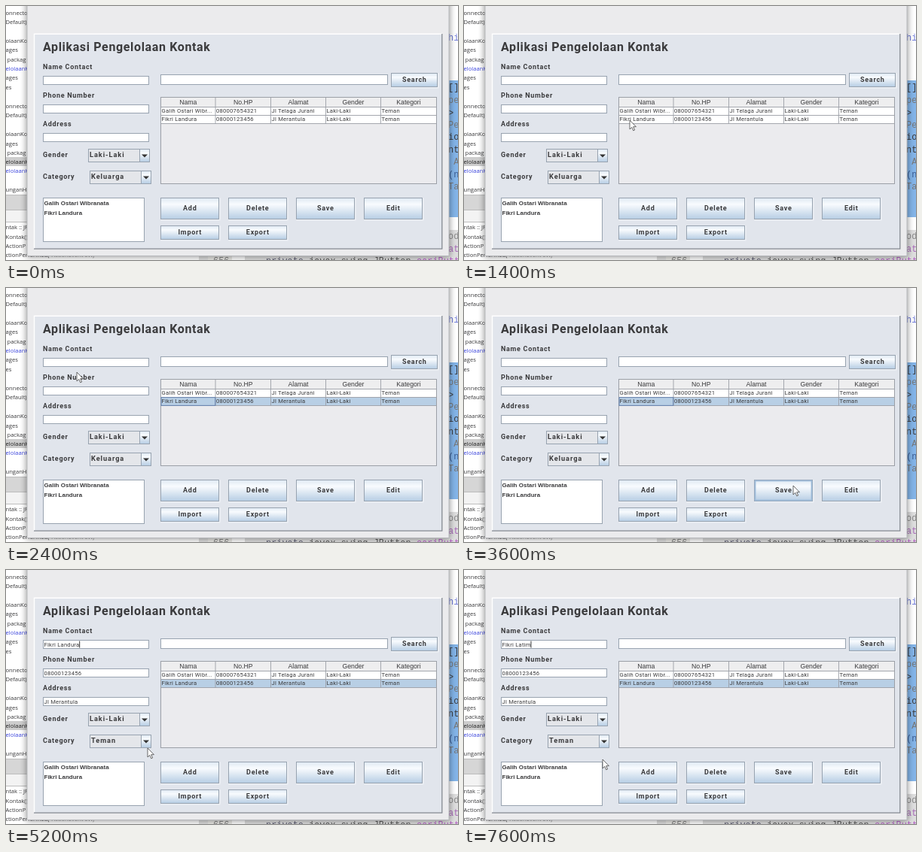
An HTML page that plays this animation: 600 by 338 pixels, repeating every 8000 ms.

```html
<!DOCTYPE html>
<html lang="id">
<head>
<meta charset="utf-8">
<title>Aplikasi Pengelolaan Kontak</title>
<style>
html, body { margin: 0; width: 100%; height: 100%; overflow: hidden; background: #fff; }
svg { display: block; width: 100%; height: 100%; }
text { white-space: pre; fill: #3a3a3c; }
.title { font: 700 16px Roboto, sans-serif; letter-spacing: .64px; }
.label { font: 700 9px Roboto, sans-serif; letter-spacing: .7px; }
.btn { font: 700 9px Roboto, sans-serif; letter-spacing: .75px; }
.combo { font: 700 9.2px Roboto, sans-serif; letter-spacing: .95px; }
.cell { font: 7.6px Roboto, sans-serif; letter-spacing: .25px; }
.head { font: 8.7px "Liberation Sans", Arial, sans-serif; }
.item { font: 700 8px "Liberation Sans", Arial, sans-serif; }
.tree { font: 7.6px "Open Sans", sans-serif; }
.code { font: 11.9px "Liberation Mono", monospace; }
.mid { text-anchor: middle; }
</style>
</head>
<body>
<svg id="stage" viewBox="0 0 600 338" preserveAspectRatio="none">
  <defs>
    <linearGradient id="metal" x2="0" y2="1">
      <stop offset="0" stop-color="#dfe9f3"/>
      <stop offset=".3" stop-color="#f8fbfe"/>
      <stop offset=".5" stop-color="#e6eef6"/>
      <stop offset="1" stop-color="#b6cde4"/>
    </linearGradient>
    <filter id="blur" x="-10%" y="-10%" width="120%" height="120%"><feGaussianBlur stdDeviation="4"/></filter>
  </defs>
</svg>
<script>
const LOOP = 8000, STEP = 200;
const BORDER = '#98a3b0', GRID = '#9b9fa6';
const svg = document.getElementById('stage');

function el(tag, attrs, parent = svg) {
  const node = document.createElementNS('http://www.w3.org/2000/svg', tag);
  for (const k in attrs) node.setAttribute(k, attrs[k]);
  return parent.appendChild(node);
}
function rect(x, y, width, height, fill, stroke = 'none', more = {}) {
  return el('rect', { x, y, width, height, fill, stroke, ...more });
}
function text(x, y, str, cls, fill) {
  const node = el('text', { x, y, class: cls });
  if (fill) node.style.fill = fill;
  node.textContent = str;
  return node;
}
function line(d, stroke, width = 1) {
  return el('path', { d, stroke, fill: 'none', 'stroke-width': width });
}
function show(node, on) {
  node.setAttribute('visibility', on ? 'visible' : 'hidden');
}

const person = {
  full: 'Galih Ostari Wibranata', cut: 'Galih Ostari Wibr...',
  phone: '080007654321', street: 'Jl Telaga Jurani'
};
const second = { name: 'Fikri Landura', phone: '08000123456', street: 'Jl Merantula' };
const stem = 'Fikri La', ending = 'tim';

// Editor behind the window
function drawEditor() {
  rect(0, 0, 600, 338, '#fff');
  rect(0, 201, 40, 12, '#cdcdcd');
  rect(0, 251.5, 40, 19.5, '#d6d6d6');
  rect(0, 271, 40, 16, '#f3f3f3');
  line('M0 251.5H40M0 271.5H40M0 287.5H40', '#bdbdbd');
  const blue = '#3a44dd';
  [[9, 'onnecto'], [21, 'Default)'], [46, 'olaanKon'], [58, 'ages'], [71, ' packag'],
   [83, 'elolaanK', blue], [95, 'ages'], [108, 'es'], [133, 'onnecto'], [145, 'Default)'],
   [170, 'olaanKon'], [183, 'ages'], [195, ' packag'], [207, 'elolaanK', '#222'],
   [219, 'elolaanK', blue], [244, 'unganH'], [294, 'ntak :: JF'], [307, 'Kontak()'],
   [319, 'ActionP'], [331, 'ctionPerformed(']
  ].forEach(([y, s, c]) => text(-.5, y + 2.7, s, 'tree', c));
  text(60.5, 333.7, 'ActionEvent evt)', 'tree', '#888');

  rect(256, 325, 12, 13, '#dcdcdc');
  rect(268, 325, 32, 13, '#e9e8e4');
  rect(300, 325, 300, 13, '#fff');
  rect(317, 298, 283, 40, '#dedede');
  text(275, 343, '656', 'code', '#808080');
  text(345, 343, 'private', 'code', '#5c5c70');
  text(402, 343, 'javax.swing.JButton', 'code', '#555');
  text(545, 343, 'cariButton', 'code', '#b45fc4');

  rect(580, 99, 20, 182, '#83b4e8');
  [[42, 'hi', '#6a76d8'], [108, '[]'], [125, 'pe', '#777'], [142, '>'], [158, 'Pe', '#777'],
   [174, 'io'], [191, 'nt'], [207, ' A', '#777'], [224, '(n', '#3a5a90'], [240, 'Ta', '#777'],
   [306, 'od', '#888'], [323, 'at', '#a868b8']
  ].forEach(([y, s, c]) => text(587, y + 4, s, 'code', c));
}

function drawWindow() {
  rect(27, -20, 562, 354, '#000', 'none', { opacity: .42, filter: 'url(#blur)' });
  rect(28, -2, 560, 334.6, '#ebebed', '#b7b9bc');
  rect(37, 37, 542, 286.5, '#e1e5ec');
  line('M37.5 323V37.3H579', '#fff', 1.4);
  line('M37 323.2H578.8V37', '#858a92', 1.3);
}

function field(x, y, w, h) {
  rect(x + .5, y + .5, w - 1, h - 1, '#fff', BORDER);
}

function button(x, y, w, h, label) {
  rect(x + 1, y + 1, w, h, 'none', '#f1f4f8');
  rect(x + .5, y + .5, w - 1, h - 1, 'url(#metal)', BORDER);
  const hover = rect(x + 1.5, y + 1.5, w - 3, h - 3, 'none', '#9dbbd9', { 'stroke-width': 1.8 });
  text(x + w / 2 + .3, y + h / 2 + 2.3, label, 'btn mid');
  return { hit: (px, py) => px > x && px < x + w && py > y && py < y + h, hover };
}

function combo(x, y, w, h, label) {
  rect(x + .5, y + .5, w - 1, h - 1, '#e4e6ea', BORDER);
  rect(x + w - 13.5, y + .5, 13, h - 1, 'url(#metal)', BORDER);
  const cx = x + w - 7, cy = y + h / 2;
  el('path', { d: `M${cx - 4} ${cy - 1.5}h8l-4 4z`, fill: '#333' });
  return text(x + 2, cy + 2.4, label, 'combo');
}

drawEditor();
drawWindow();
text(49, 59.8, 'Aplikasi Pengelolaan Kontak', 'title');
[[84.3, 'Name Contact'], [122.3, 'Phone Number'], [160.3, 'Address'], [201.3, 'Gender'], [230.3, 'Category']]
  .forEach(([y, s]) => text(49, y, s, 'label'));

const inputs = [93, 131, 169].map(y => {
  field(49, y, 141, 12);
  return text(50.5, y + 8.6, '', 'cell');
});
const caret = line('', '#222', .9);
field(205, 91, 302, 14);
combo(109, 190, 82, 18, 'Laki-Laki');
const category = combo(111, 219, 82, 18, 'Keluarga');

// Contact table
const cols = [205.5, 278, 351.5, 424.5, 497.5, 571.5];
rect(205.5, 121.5, 366, 115, '#ebebee', GRID);
rect(206, 122, 365, 12, '#eeeeef');
rect(206, 134.5, 365, 11, '#fff');
const row = rect(206, 145.5, 365, 11, '#fff');
line('M205.5 134.5H571.5M205.5 145.5H571.5M205.5 156.5H571.5', GRID, .9);
cols.slice(1, 5).forEach(x => line(`M${x} 122V156.5`, GRID, .9));
['Nama', 'No.HP', 'Alamat', 'Gender', 'Kategori']
  .forEach((s, i) => text((cols[i] + cols[i + 1]) / 2, 131.2, s, 'head mid'));
const cells = [
  [person.cut, person.phone, person.street, 'Laki-Laki', 'Teman'],
  [second.name, second.phone, second.street, 'Laki-Laki', 'Teman']
];
cells.forEach((list, r) => list.forEach((s, i) => text(cols[i] + 1, 142 + r * 10.8, s, 'cell')));
const cellFocus = rect(206, 145.7, 71.8, 10.6, 'none', '#5f7fb0', { 'stroke-width': .9 });

field(49, 255, 135, 59);
text(50.5, 264.8, person.full, 'item');
text(50.5, 277.5, second.name, 'item');

const buttons = [
  [511, 89, 62, 19, 'Search'], [205, 255, 78, 29, 'Add'], [295, 255, 78, 29, 'Delete'],
  [385, 255, 78, 29, 'Save'], [475, 255, 78, 29, 'Edit'],
  [205, 292, 78, 19, 'Import'], [295, 292, 78, 19, 'Export']
].map(b => button(...b));
const editFocus = rect(503.5, 262.5, 20, 12, 'none', '#a3b8cc');

const pointer = el('path', {
  d: 'M0 0V12L2.8 9.4L4.7 13.8L6.6 13L4.7 8.7H8.4Z',
  fill: '#fff', stroke: '#444', 'stroke-width': .8, 'stroke-linejoin': 'round'
});

// time, x, y
const path = [
  [200, 330, 330], [600, 300, 230], [1000, 228, 160], [1400, 220, 152], [1600, 220, 152],
  [2000, 150, 128], [2400, 94, 112], [2600, 102, 115], [3000, 250, 190], [3400, 425, 257],
  [3600, 437, 263], [3800, 437, 263], [4200, 484, 260], [4400, 420, 225], [4600, 230, 140],
  [4800, 122, 100], [5000, 130, 104], [5200, 188, 237], [7000, 184, 252], [LOOP, 184, 252]
];

function pointerAt(t) {
  const i = Math.max(1, path.findIndex(p => p[0] >= t));
  const [t0, x0, y0] = path[i - 1], [t1, x1, y1] = path[i];
  const k = Math.max(0, (t - t0) / (t1 - t0));
  return [x0 + (x1 - x0) * k, y0 + (y1 - y0) * k];
}

function nameAt(t) {
  const erased = Math.max(0, Math.floor((t - 5600) / STEP) + 1);
  const spare = second.name.length - stem.length;
  if (erased <= spare) return second.name.slice(0, second.name.length - erased);
  return stem + ending.slice(0, erased - spare);
}

function render(time) {
  const t = Math.floor((time % LOOP) / STEP) * STEP;
  const [x, y] = pointerAt(t), filled = t >= 4200;
  pointer.setAttribute('transform', `translate(${x} ${y})`);
  show(pointer, t >= 200);
  buttons.forEach(b => show(b.hover, t >= 200 && b.hit(x, y)));

  row.setAttribute('fill', t >= 1600 ? '#b8cfe5' : '#fff');
  show(cellFocus, t >= 1600 && t < 4200);
  show(editFocus, filled && t < 5000);

  const values = filled ? [nameAt(t), second.phone, second.street] : ['', '', ''];
  inputs.forEach((node, i) => { node.textContent = values[i]; });
  category.textContent = filled ? 'Teman' : 'Keluarga';

  const end = 50.8 + (values[0] ? inputs[0].getComputedTextLength() : 0);
  caret.setAttribute('d', `M${end} 94.5V103.5`);
  show(caret, t >= 5000 && t !== 7400);
}

function tick(now) {
  render(now);
  requestAnimationFrame(tick);
}
render(0);
requestAnimationFrame(tick);
</script>
</body>
</html>
```
